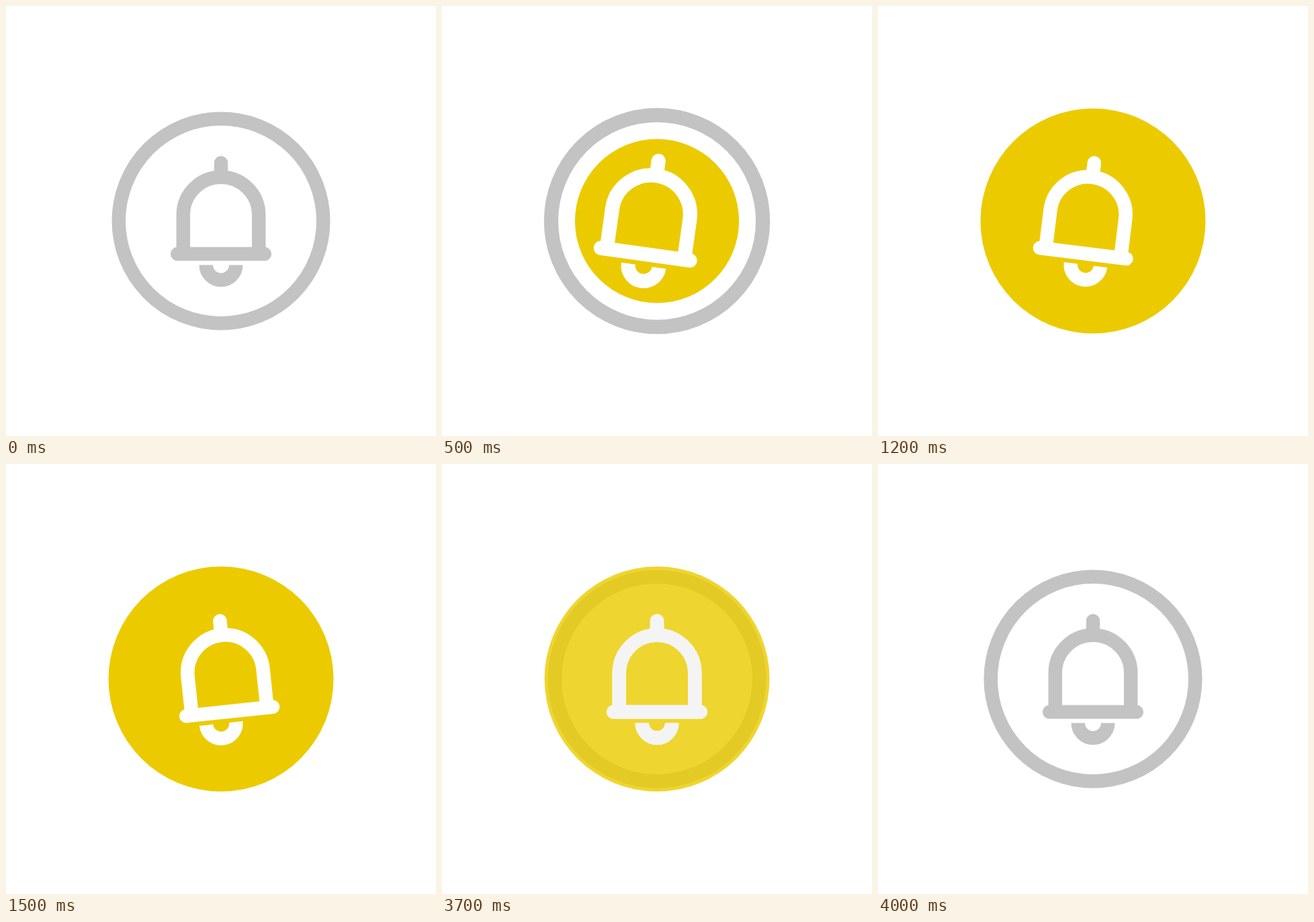
Recreate the animation shown at these times as an HTML page with a canvas. Size 640 by 640 pixels, loop 4.8 s.

```html
<!DOCTYPE html>
<html lang="en">
<head>
<meta charset="utf-8">
<title>Bell</title>
<style>
html, body { margin: 0; width: 100%; height: 100%; overflow: hidden; background: #fff; }
canvas { display: block; width: 100%; height: 100%; }
</style>
</head>
<body>
<canvas id="stage" width="640" height="640"></canvas>
<script>
const ctx = document.getElementById('stage').getContext('2d');
const LOOP = 4800, STEP = 100;
const C = 320, PIVOT = 249, LINE = 20.5;
const GRAY = 195, YELLOW = '#ebcb00';

// Keys are [time, value]; motion eases in and out between them.
const SCALE = [[100, 1], [300, 1.1], [740, 0.95], [800, 0.95], [1000, 1.05], [1200, 1]];
const SWING = [[150, 0], [500, 8], [910, -7], [1150, 7.6], [1600, -8], [1880, 0]];
const CLAPPER = [[150, 0], [330, 10], [790, -23], [1060, 22], [1400, -22], [1740, 15], [1960, 0]];
const DISC = [[150, 0], [697, 167.5]];
const SHADE = [[150, GRAY], [450, 255]];
const FADE = [[3600, 0], [3964, 1]];

function at(keys, t) {
  if (t <= keys[0][0]) return keys[0][1];
  for (let i = 1; i < keys.length; i++) {
    const [t0, a] = keys[i - 1], [t1, b] = keys[i];
    if (t < t1) {
      const x = (t - t0) / (t1 - t0);
      return a + (b - a) * x * x * (3 - 2 * x);
    }
  }
  return keys[keys.length - 1][1];
}

const gray = v => `rgb(${v},${v},${v})`;

function circle(r) {
  ctx.beginPath();
  ctx.arc(C, C, r, 0, Math.PI * 2);
}

function line(x0, y0, x1, y1) {
  ctx.lineCap = 'round';
  ctx.beginPath();
  ctx.moveTo(x0, y0);
  ctx.lineTo(x1, y1);
  ctx.stroke();
}

function bell(color, angle, shift) {
  ctx.save();
  ctx.translate(C, PIVOT);
  ctx.rotate(angle * Math.PI / 180);
  ctx.translate(-C, -PIVOT);
  ctx.strokeStyle = color;
  ctx.lineWidth = LINE;

  line(C, 233.5, C, 249);
  line(255.2, 369, 384.8, 369);

  ctx.lineCap = 'butt';
  ctx.beginPath();
  ctx.moveTo(C - 56.25, 369);
  ctx.arc(C, 311, 56.25, Math.PI, 0);
  ctx.lineTo(C + 56.25, 369);
  ctx.stroke();

  ctx.beginPath();
  ctx.arc(C + shift, 385.5, 22.25, 0, Math.PI);
  ctx.stroke();
  ctx.restore();
}

function icon(t) {
  const s = at(SCALE, t), r = at(DISC, t);
  ctx.save();
  ctx.translate(C, C);
  ctx.scale(s, s);
  ctx.translate(-C, -C);

  circle(152.25);
  ctx.strokeStyle = gray(GRAY);
  ctx.lineWidth = LINE;
  ctx.stroke();

  if (r > 0) {
    // The finished disc hides the ring.
    circle(r);
    ctx.fillStyle = YELLOW;
    ctx.fill();
  }
  bell(gray(Math.round(at(SHADE, t))), at(SWING, t), at(CLAPPER, t));
  ctx.restore();
}

function layer(t, alpha) {
  ctx.globalAlpha = alpha;
  ctx.fillStyle = '#fff';
  ctx.fillRect(0, 0, 640, 640);
  ctx.globalAlpha = 1;
  icon(t);
}

// Blend the active icon into the idle one, part by part.
function blend(p) {
  layer(2000, 1);
  ctx.fillStyle = `rgba(255,255,255,${p})`;
  ctx.fillRect(0, 0, 640, 640);
  const v = Math.round(255 + (GRAY - 255) * p);
  circle(152.25);
  ctx.lineWidth = LINE;
  // Gray over the already whitened disc gives a plain cross-fade.
  const mix = c => Math.round(c * (1 - p) + GRAY * p);
  ctx.strokeStyle = `rgb(${mix(235)},${mix(203)},${mix(0)})`;
  ctx.stroke();
  bell(gray(v), 0, 0);
}

function draw(now) {
  const t = Math.floor((now % LOOP) / STEP) * STEP;
  const p = at(FADE, t);
  if (p <= 0) layer(t, 1);
  else if (p >= 1) layer(0, 1);
  else blend(p);
}

const start = performance.now();
function tick() {
  draw(performance.now() - start);
  requestAnimationFrame(tick);
}
tick();
</script>
</body>
</html>
```
